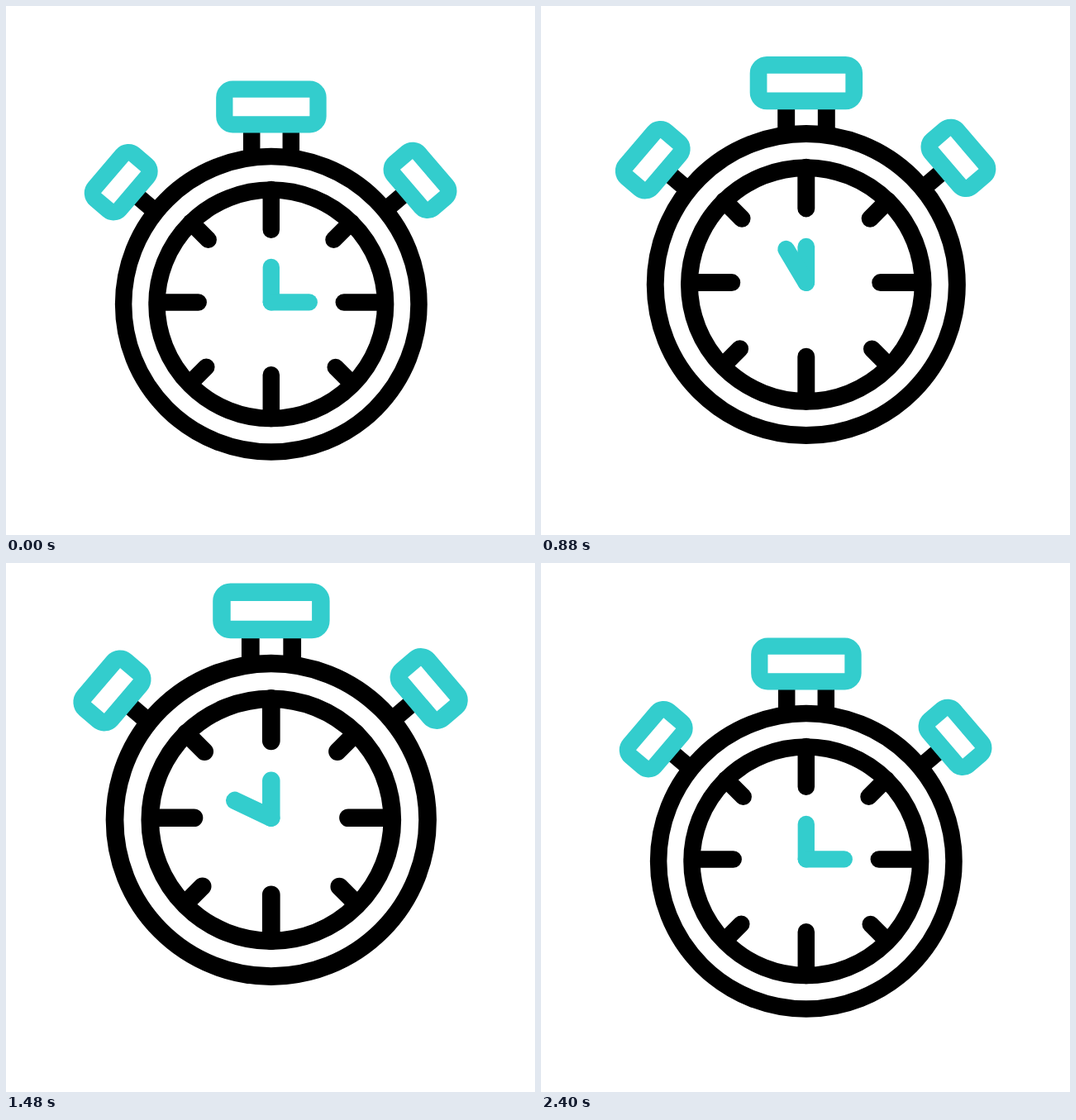
Animation of 640 by 640 pixels, one loop 2.7 s. Source, as an HTML page:

```html
<!DOCTYPE html>
<html lang="en">
<head>
<meta charset="utf-8">
<title>Stopwatch</title>
<style>
  html, body { margin: 0; height: 100%; overflow: hidden; background: #fff; }
  svg { display: block; width: 100vw; height: 100vh; }
  .ink { fill: none; stroke: #000; stroke-width: 20.5; }
  .teal { fill: #fff; stroke: #33cdcd; stroke-width: 20.3; }
  .round { stroke-linecap: round; stroke-linejoin: round; }
</style>
</head>
<body>
<svg viewBox="0 0 640 640">
  <path id="rays" class="teal round"/>
  <g id="watch">
    <path class="ink" d="M297.2 152V182M344.8 152V182"/>
    <g id="cap"><rect class="teal" x="264.3" y="100.7" width="113.2" height="42.6" rx="10"/></g>
    <g transform="translate(139.2 213.2) rotate(-49.5)">
      <path class="ink" d="M0 28V60"/>
      <rect class="teal" x="-35.7" y="-20" width="71.4" height="40" rx="10"/>
    </g>
    <g transform="translate(501 210.9) rotate(49.5)">
      <path class="ink" d="M0 28V60"/>
      <rect class="teal" x="-35.7" y="-20" width="71.4" height="40" rx="10"/>
    </g>
    <circle class="ink" cx="320.8" cy="360.8" r="178.7"/>
    <circle class="ink" cx="320.8" cy="360.8" r="138.3"/>
    <path class="ink round" d="M320.8 222V270.7M320.8 446.2V499M183 358.4H232.7M408.8 358.4H458
      M223.7 261.7l21 21M417.5 261.7l-21 21M222.3 456.8l20 -20M418.7 457l-20 -20"/>
    <path class="teal round" d="M320.8 316V358.4"/>
    <path id="hand" class="teal round" d="M320.8 358.4H366.8"/>
  </g>
</svg>
<script>
const LOOP = 2700, STEP = 20, HOLD = 200, LAST = 110;
const CX = 320.8, CY = 360.8, PIVOT_Y = 358.4;
const [rays, watch, cap, hand] = ['rays', 'watch', 'cap', 'hand'].map(id => document.getElementById(id));
const clamp = v => Math.min(1, Math.max(0, v));
const smooth = v => (v = clamp(v), v * v * (3 - 2 * v));

// Cubic ease with control points (x1, 0) and (x2, 1)
function ease(x, x1, x2) {
  let lo = 0, hi = 1;
  for (let i = 0; i < 24; i++) {
    const t = (lo + hi) / 2, u = 1 - t;
    if (3 * u * u * t * x1 + 3 * u * t * t * x2 + t * t * t < x) lo = t; else hi = t;
  }
  return smooth(lo);
}

// Keys: [step, value, x1, x2], the ease leading to the next key
const height = [[0, CY, .33, .67], [9, 400.8, .009, .287], [74, 309.3, .3, .593], [90, 381.8, .05, .05], [108, CY]];
const size = [[0, 1, .33, .67], [9, .9465, .149, .276], [74, 1.061, .3, .452], [90, .967, .25, .3], [108, 1]];

function track(keys, n) {
  const i = keys.findIndex((k, j) => j > 0 && n < k[0]);
  if (i < 0) return keys[keys.length - 1][1];
  const [from, a, x1, x2] = keys[i - 1], [to, b] = keys[i];
  return a + (b - a) * ease((n - from) / (to - from), x1, x2);
}

// A ray slides outwards along its line; its tail follows the head
function rayPath(local, lift) {
  const head = 67 * smooth(local / 12) - 10, tail = 67 * smooth((local - 3) / 12) - 10;
  if (head - tail < .1) return '';
  return [[320, 108, 0, -1], [263, 121, -.6, -.8], [377, 121, .6, -.8]].map(([x, y, dx, dy]) =>
    `M${x + dx * tail} ${y - lift + dy * tail}L${x + dx * head} ${y - lift + dy * head}`).join('');
}

function draw(now) {
  const n = Math.min(LAST, Math.max(0, Math.floor((now % LOOP - HOLD) / STEP)));
  const second = n >= 81, local = second ? n - 81 : n;
  const press = 18.2 * Math.sin(Math.PI * clamp(local / 17)) ** 2;
  const turn = -1080 * ease(clamp((n - 4) / 106), .118, .394);
  watch.setAttribute('transform',
    `translate(${CX} ${track(height, n)}) scale(${track(size, n)}) translate(${-CX} ${-CY})`);
  cap.setAttribute('transform', `translate(0 ${press})`);
  hand.setAttribute('transform', `rotate(${turn} ${CX} ${PIVOT_Y})`);
  rays.setAttribute('d', rayPath(local - 2, second ? 7 : 0));
}

let start;
function tick(now) {
  start ??= now;
  draw(now - start);
  requestAnimationFrame(tick);
}
draw(0);
requestAnimationFrame(tick);
</script>
</body>
</html>
```
